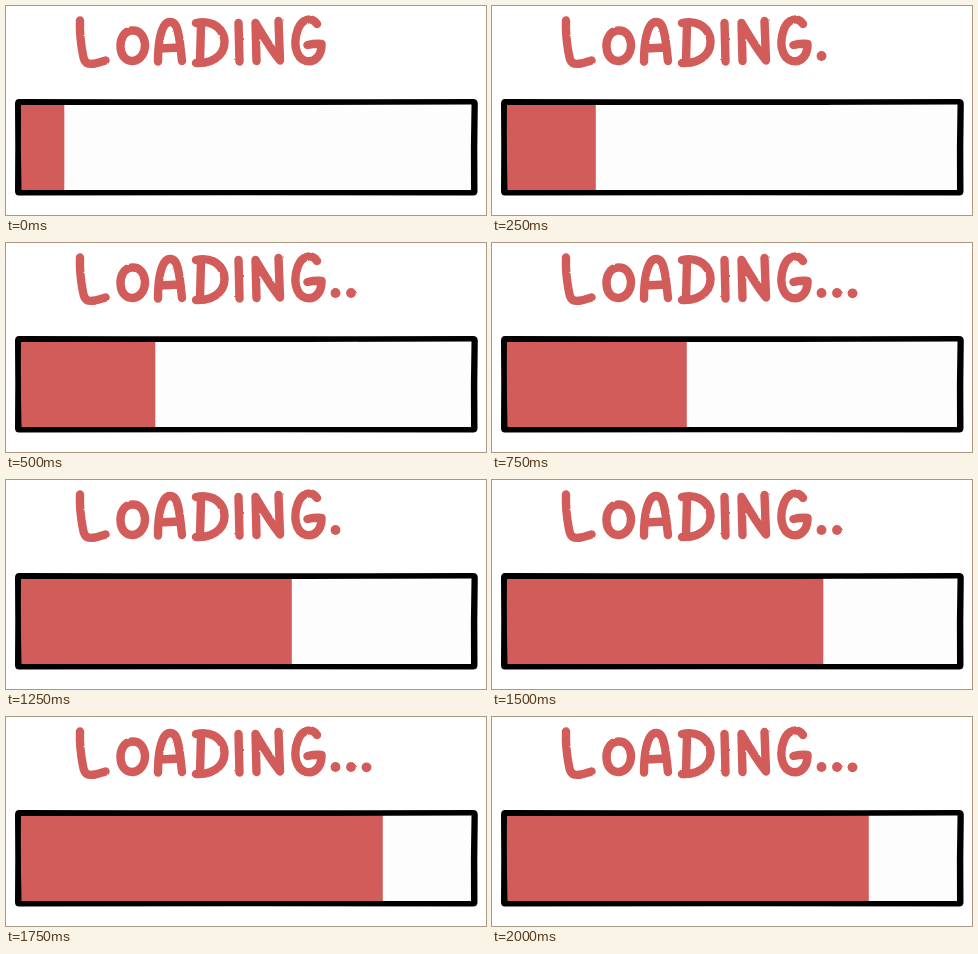
An HTML page for the animation above (3.25 s loop, 480 by 209 pixels).

```html
<!DOCTYPE html>
<html lang="en">
<head>
<meta charset="utf-8">
<title>Loading</title>
<style>
  html, body { margin: 0; width: 100%; height: 100%; overflow: hidden; background: #fff; }
  svg { display: block; width: 480px; height: 209px; }
  .letters { fill: none; stroke: #d15c5a; stroke-width: 8.4; stroke-linecap: round; stroke-linejoin: round; }
  .red { fill: #d15c5a; }
</style>
</head>
<body>
<svg viewBox="0 0 480 209" role="img" aria-label="Loading">
  <!-- slightly uneven brush edge -->
  <filter id="brush" filterUnits="userSpaceOnUse" x="0" y="0" width="480" height="80" color-interpolation-filters="sRGB">
    <feTurbulence type="fractalNoise" baseFrequency=".25" seed="4"/>
    <feDisplacementMap in="SourceGraphic" scale="2" xChannelSelector="R" yChannelSelector="G"/>
  </filter>
  <g filter="url(#brush)">
    <g class="letters">
      <path d="M74 14.500C73.500 27 75 39 77 49C78.500 58 82 58.500 89 57.500C93 56.500 96 55.500 99.500 54.500"/>
      <path d="M126 24.500C118 25 114 33 114.500 41C115 50 120 55.500 127 55C135 54 139.500 46 139 38C138 29 133 24 126 24.500"/>
      <path d="M152 55.500C152 41 154 27 158 20C162 14 168 15 170.500 21C174 30 174.500 43 176 55M154 42.500L173 41.500"/>
      <path d="M190 17C203 14 214 19 218 31C221 45 211 58 190 57M195 19L194 55"/>
      <path d="M232.500 17L233.500 55.500"/>
      <path d="M250.500 55L249.500 17C256 28 264 42 274 54.500L272.500 15"/>
      <path d="M311 18C306 10 296 13 292 23C287 36 289 52 300 55C309 57 316 49 315.500 38C311 37.500 306 38 301.500 39"/>
    </g>
    <g id="dots" class="red">
      <circle cx="329.500" cy="50" r="4.900"/>
      <circle cx="345" cy="50" r="4.900"/>
      <circle cx="360.500" cy="50.300" r="4.900"/>
    </g>
  </g>
  <path fill="#fdfdfd" d="M12 96H468V187H12Z"/>
  <rect id="fill" class="red" x="14" y="97" height="89"/>
  <path fill-rule="evenodd"
        d="M13 93Q240 93.500 467 93Q471.800 93 471.800 98Q471 141 471.500 185Q471.500 189.500 467 189.500Q240 189 13 189.500Q9 189.500 9 185Q9.500 141 9 98Q9 93 13 93Z
           M15 99L300 99L465.500 98.500Q464.500 141 465 184L15.500 184Q14.500 141 15 99Z"/>
</svg>
<script>
  const STEP = 250, LOOP = 3250, LAST = 7;
  const LEFT = 14, FIRST_WIDTH = 44.3, GROWTH = 45.5;
  const bar = document.getElementById('fill');
  const dots = [...document.getElementById('dots').children];
  const start = performance.now();

  function draw(now) {
    const t = Math.max(0, now - start) % LOOP;
    const step = Math.min(Math.floor(t / STEP), LAST);
    bar.setAttribute('width', FIRST_WIDTH + GROWTH * step);
    dots.forEach((dot, i) => dot.setAttribute('visibility', i < step % 4 ? 'visible' : 'hidden'));
    requestAnimationFrame(draw);
  }
  draw(start);
</script>
</body>
</html>
```
